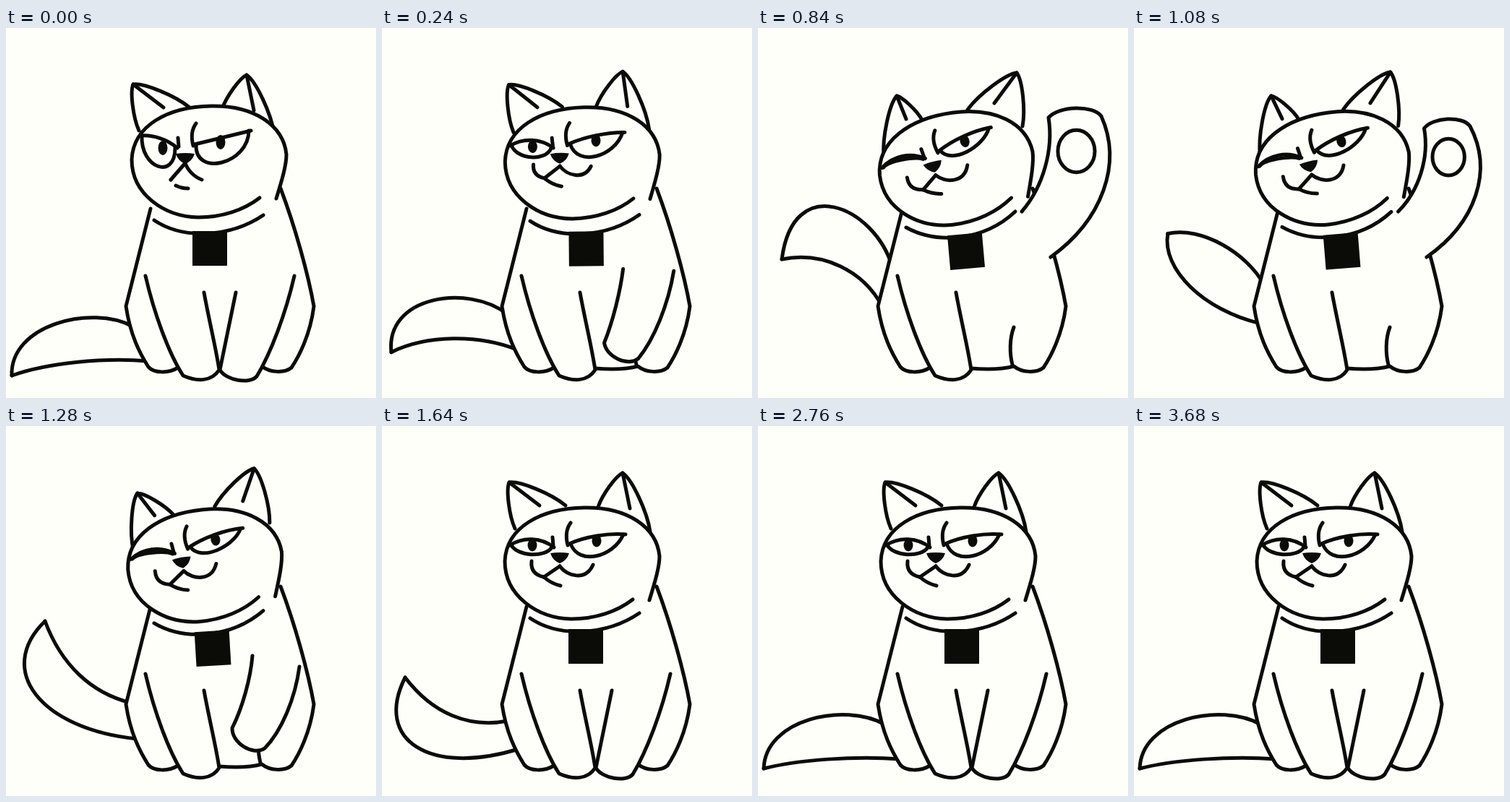
These frames come from a looping animation (512x512 px, 3720 ms). An HTML page with a canvas:

```html
<!DOCTYPE html>
<html lang="en">
<head>
<meta charset="utf-8">
<title>Waving cat</title>
<style>
  html, body { margin: 0; width: 100%; height: 100%; overflow: hidden; background: #fffffa; }
  canvas { display: block; width: 100%; height: 100%; }
</style>
</head>
<body>
<canvas width="512" height="512"></canvas>
<script>
const ctx = document.querySelector('canvas').getContext('2d');
const LOOP = 3720, STEP = 40, PAPER = '#fffffa', INK = '#0b0b08';

// Keys: [ms, value...]
const grumpKeys = [[0, 1], [40, 1], [300, 0]];
const tiltKeys = [[0, 0], [120, 0], [520, .65], [840, 1], [960, 1], [1280, .68], [1640, 0]];
const winkKeys = [[600, 0], [740, 1], [1320, 1], [1460, 0]];
const armKeys = [[0, 0], [520, 2], [840, 3], [930, 3.15], [1280, 1], [1560, 0]];
// upper root y, tip x, tip y, lower root y, upper bow, lower bow
const tailKeys = [
  [0, 413, 8, 481, 461, 58, 12],
  [520, 360, 23, 382, 414, 84, 37],
  [840, 330, 33, 320, 385, 102, 34],
  [1280, 383, 54, 270, 433, -28, -97],
  [1640, 408, 32, 348, 447, -31, -97],
  [2400, 413, 8, 474, 461, 56, 9]
];
// Inner root, two paw corners, outer root, then the bow of each side
const armPoses = [
  [318, 366, 296, 473, 347, 482, 399, 343, 0, -13, -7],
  [341, 318, 313, 418, 358, 446, 406, 333, 6, -18, -12],
  [366, 254, 401, 152, 456, 148, 405, 317, -19, 14, 50],
  [365, 254, 402, 124, 475, 122, 405, 317, -19, 16, 50]
];

const clamp = (v, lo = 0, hi = 1) => Math.min(hi, Math.max(lo, v));
const mix = (a, b, u) => a + (b - a) * u;
const mixAll = (a, b, u) => a.map((v, i) => mix(v, b[i], u));

// Monotone cubic through the keys
function sample(keys, t) {
  const last = keys.length - 1;
  t = clamp(t, keys[0][0], keys[last][0]);
  let i = 0;
  while (i < last - 1 && t >= keys[i + 1][0]) i++;
  const span = keys[i + 1][0] - keys[i][0], u = (t - keys[i][0]) / span;
  return keys[i].slice(1).map((_, n) => {
    const c = n + 1;
    const slope = k => (keys[k + 1][c] - keys[k][c]) / (keys[k + 1][0] - keys[k][0]);
    const tangent = k => {
      if (!k || k === last) return 0;
      const a = slope(k - 1), b = slope(k);
      return a * b > 0 ? 2 * a * b / (a + b) : 0;
    };
    return mix(keys[i][c], keys[i + 1][c], u * u * (3 - 2 * u))
      + span * u * (1 - u) * (tangent(i) * (1 - u) - tangent(i + 1) * u);
  });
}

function draw(d, fill) {
  const path = new Path2D(d);
  if (fill) { ctx.fillStyle = fill; ctx.fill(path); }
  ctx.stroke(path);
}

function ellipse(x, y, rx, ry, solid) {
  ctx.beginPath();
  ctx.ellipse(x, y, rx, ry, 0, 0, 7);
  if (solid) { ctx.fillStyle = INK; ctx.fill(); } else ctx.stroke();
}

// Bowed curve segment from a to b; u and v place the two handles along the chord
function arc([ax, ay], [bx, by], bow, u = .3, v = .7, skew = 0) {
  const dx = bx - ax, dy = by - ay, len = Math.hypot(dx, dy) || 1;
  const handle = (k, h) => `${ax + dx * k + dy / len * h} ${ay + dy * k - dx / len * h}`;
  return `C${handle(u, bow * (1 + skew))} ${handle(v, bow * (1 - skew))} ${bx} ${by}`;
}

function group(x, y, degrees, dx, dy, body) {
  ctx.save();
  ctx.translate(x + dx, y + dy);
  ctx.rotate(degrees * Math.PI / 180);
  ctx.translate(-x, -y);
  body();
  ctx.restore();
}

// Left outline of the body, where the tail slides
const flank = y => y < 385 ? 166 + (385 - y) * .25 : 166 + 31 * ((y - 385) / 84) ** 2;

function drawTail([top, x, y, bottom, upper, lower]) {
  const s = clamp(upper / 80), q = clamp((lower + 97) / 130), tip = [x, y];
  draw(`M${tip}` + arc(tip, [flank(top) + 6, top], upper, .35 - .3 * s, .7 + .1 * s, .2 * s));
  draw(`M${tip}` + arc(tip, [flank(bottom) + 6, bottom], lower, .05 + .25 * q, .55 + .15 * q));
}

function drawBody() {
  draw(`M200 250L166 385C172 425 185 450 197 469C205 478 225 478 238 470L295 471
    C320 473 340 472 354 468C365 477 385 478 395 470C405 455 421 425 426 385C418 340 400 275 380 222`, PAPER);
  draw('M354 414C348 430 348 450 352 466');
  draw('M193 343C205 395 225 450 245 481C265 490 285 489 295 473C290 440 281 405 274 366', PAPER);
}

function drawArm(p) {
  const i = Math.min(Math.floor(p), armPoses.length - 2);
  const [ix, iy, lx, ly, rx, ry, ox, oy, inner, paw, outer] = mixAll(armPoses[i], armPoses[i + 1], p - i);
  const root = [ix, iy], left = [lx, ly], right = [rx, ry];
  draw(`M${root}` + arc(root, left, inner) + arc(left, right, paw, .2, .85)
    + arc(right, [ox, oy], outer, .25, .65), PAPER);
  const size = (rx - lx) * clamp(p - 1);
  if (size > 0) ellipse((lx + rx) / 2 + 2, (ly + ry) / 2 + size * .65, size * .35, size * .4);
}

function drawCollar(k) {
  draw(`M205 ${266 + 10 * k}C245 ${293 + 5 * k} 310 ${290 + 7 * k} 356 ${259 - 5 * k}`);
  group(282, 305, -5 * k, 6 * k, 4 * k, () => {
    ctx.fillStyle = INK;
    ctx.fillRect(258, 281, 48, 48);
  });
}

// Points: outer base, tip, other base, end of the inner fold
function drawEar(upright, tilted, k) {
  const [ax, ay, tx, ty, bx, by, fx, fy] = mixAll(upright, tilted, k);
  const tip = [tx, ty], a = [ax, ay], b = [bx, by];
  const bow = p => .09 * Math.hypot(p[0] - tx, p[1] - ty);
  draw(`M${a}` + arc(a, tip, bow(a), .3, .85) + arc(tip, b, bow(b), .15, .7), PAPER);
  draw(`M${tip}L${fx} ${fy}`);
}

function drawEye(x0, y0, x1, y1, lid, depth, grump) {
  const inset = (x1 - x0) * .17 * (1 - grump);
  draw(`M${x0} ${y0}` + arc([x0, y0], [x1, y1], lid));
  const end = x1 - 3;
  draw(`M${x0 + 2} ${y0}C${x0 + inset} ${y0 + depth} ${end - inset} ${y1 + depth} ${end} ${y1}`);
}

function drawFace(g, wink) {
  drawEye(177 + 7 * g, 165 - 14 * g, 238 - 3 * g, 168, 13 - 6 * g, mix(15 + 30 * g, -7, wink), g);
  drawEye(259, 163, 337, 150 - 6 * g, 6 * (1 - g), 31 + 15 * g - 8 * wink, g);
  ellipse(208 + 7 * g, 165 + 3 * g, 6.5, (8.5 + 1.5 * g) * (1 - wink), true);
  ellipse(297 - 2 * g, 159 + g, 6.5, 8.5 + 1.5 * g, true);
  draw('M236 154L237 166');
  draw('M261 134C255 142 254 153 257 165');

  ctx.fillStyle = INK;
  ctx.fill(new Path2D('M233 176Q246 174 259 176Q256 186 246 190Q236 186 233 176'));
  const corner = mixAll([224, 209], [226, 212], g);
  draw(`M246 ${194 - 5 * g}L${corner}`);
  draw(`M${corner}Q${mixAll([205, 205], corner, g)} ${mixAll([207, 187], corner, g)}`);
  draw(`M246 ${194 - 5 * g}C${mixAll([256, 208, 282, 215, 292, 192], [249, 198, 258, 208, 269, 212], g)}`);
  draw(`M${mixAll([224, 209], [233, 220], g)}Q${mixAll([234, 218, 247, 221], [241, 224, 250, 224], g)}`);
}

function drawHead(k, g, wink) {
  group(265, 190, -3.5 * Math.sin(Math.PI * k), 0, 0, () => {
    drawEar([184, 142, 176, 78, 254, 110, 218, 110], [174, 178, 192, 94, 227, 127, 205, 126], k);
    drawEar([299, 112, 333, 65, 371, 146, 343, 114], [290, 113, 358, 62, 366, 136, 327, 104], k);
  });
  group(277, 190, -7 * k, 4 * g - 2 * k, 4 * k - 5 * g, () => draw(
    `M370 241C378 215 384 195 384 180C380 140 340 112 280 113C220 114 172 140 170 187
     C170 235 215 266 262 267C295 267 325 257 347 240`, PAPER));
  group(246, 183, -15 * k, 2 * g - 3 * k, 10 * k - 2 * g, () => drawFace(g, wink));
}

function render(time) {
  const t = Math.floor(time % LOOP / STEP) * STEP;
  const [grump] = sample(grumpKeys, t), [tilt] = sample(tiltKeys, t);
  const [wink] = sample(winkKeys, t), [arm] = sample(armKeys, t);
  ctx.fillStyle = PAPER;
  ctx.fillRect(0, 0, 512, 512);
  ctx.strokeStyle = INK;
  ctx.lineWidth = 5;
  ctx.lineCap = ctx.lineJoin = 'round';
  drawTail(sample(tailKeys, t));
  drawBody();
  drawArm(arm);
  drawCollar(tilt);
  // The head bobs up early in the tilt
  const bob = -6 * Math.sin(Math.PI * clamp(tilt / .65));
  group(0, 0, 0, 0, bob, () => drawHead(tilt, grump, wink));
}

let start;
function tick(now) {
  start ??= now;
  render(now - start);
  requestAnimationFrame(tick);
}
render(0);
requestAnimationFrame(tick);
</script>
</body>
</html>
```
